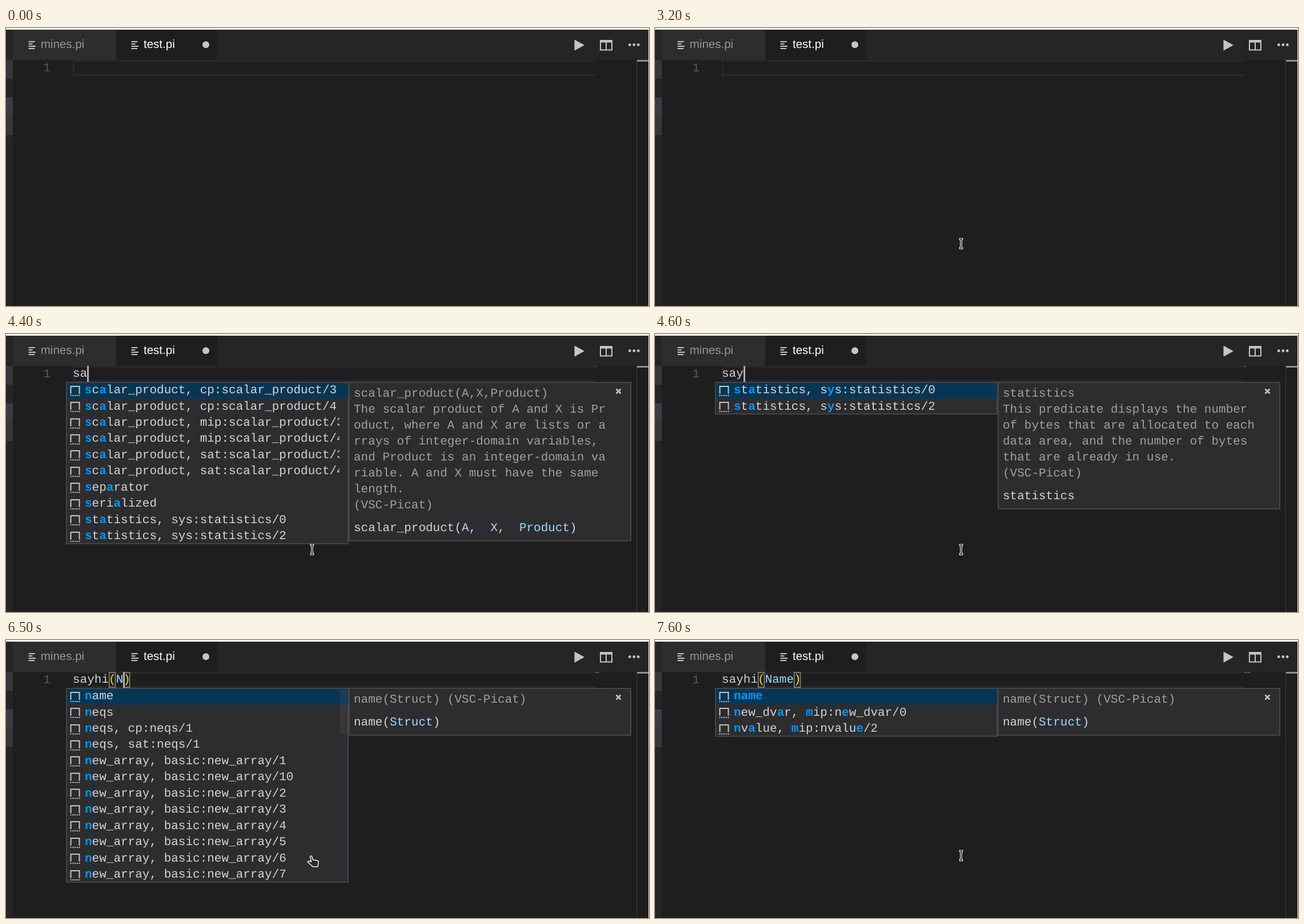
An HTML page for the animation above (8000 ms loop, 1126x488 px).

```html
<!DOCTYPE html>
<html lang="en">
<head>
<meta charset="utf-8">
<title>Editor completion</title>
<style>
html, body { margin: 0; width: 100%; height: 100%; overflow: hidden; background: #1e1e1e; }
svg { display: block; }
text { white-space: pre; text-rendering: geometricPrecision; }
.code, .code text { font: 21px "Liberation Mono", monospace; fill: #d4d4d4; }
.code .dim { fill: #a0a0a0; }
.var { fill: #9cdcfe; }
.bracket { fill: #ffd700; }
.hit { fill: #0097fb; font-weight: bold; }
.tab { font: 20.5px "Liberation Sans", sans-serif; }
.panel { fill: #2d2d30; stroke: #454545; stroke-width: 2; }
.match { fill: none; stroke: #888; stroke-width: 1.6; }
.icon { fill: none; stroke: #c5c5c5; stroke-width: 2; }
</style>
</head>
<body>
<svg width="1126" height="488" viewBox="0 0 1126 488">
  <defs>
    <clipPath id="listClip"><rect x="107" y="86" width="477" height="340"/></clipPath>
    <linearGradient id="tint" x2="0" y2="1">
      <stop stop-color="#3a3d49"/><stop offset="1" stop-color="#3f3743"/>
    </linearGradient>
    <path id="file" class="icon" d="M0 0H11M0 4H7M0 8H12.5M0 12H10.5" stroke-width="1.7"/>
    <g id="snippet" class="icon">
      <path d="M1 14V1H16V14"/>
      <path d="M0 17H17" stroke-dasharray="2 1.75"/>
    </g>
    <g id="arrow"><path d="M0 0V16L4 12.5L6.5 18.5L9.5 17.2L7 11.5H12Z" fill="#111" stroke="#fff" stroke-width="1.2"/></g>
    <g id="beam" fill="none">
      <path d="M-3.3 -8H3.3M-3.3 8H3.3M0 -9V9" stroke="#fff" stroke-width="3.6"/>
      <path d="M-2.2 -8H2.2M-2.2 8H2.2M0 -8V8" stroke="#111" stroke-width="1.4"/>
    </g>
    <path id="hand" d="M-3.5 1.5Q-2 -.5 -.3 1.5L1.5 7.5L9 8.6Q11.5 9.3 11.3 11.5L10 19.5H1.5L-4 14.5L-7.8 11.5Q-7.5 9 -4.5 9.7L-1.5 11Z"
      fill="#2a2a2a" stroke="#f4f4f4" stroke-width="1.5" stroke-linejoin="round"/>
  </defs>

  <rect width="1126" height="488" fill="#1e1e1e"/>
  <rect width="12" height="488" fill="#252526"/>
  <rect y="56" width="12" height="33" fill="#37373a"/>
  <rect y="122" width="12" height="33" fill="url(#tint)"/>
  <rect y="155" width="12" height="33" fill="#37373a"/>
  <rect y="3" width="1126" height="53" fill="#252526"/>
  <rect x="12" y="3" width="180" height="53" fill="#2d2d2d"/>
  <rect x="194" y="3" width="176" height="53" fill="#1e1e1e"/>
  <rect width="1126" height="3" fill="#eff1f0"/>
  <rect x="1125" width="1" height="488" fill="#e4e6e5"/>

  <use href="#file" x="39.5" y="24"/>
  <text class="tab" x="60.8" y="35" fill="#969696">mines.pi</text>
  <use href="#file" x="219.5" y="24"/>
  <text class="tab" x="241" y="35" fill="#fff">test.pi</text>
  <g fill="#c5c5c5">
    <circle cx="350" cy="29.3" r="6"/>
    <path d="M995.5 20.5L1013 30L995.5 39.7Z"/>
    <path d="M1040 21H1062V39.5H1040ZM1042 25.5V37.5H1050V25.5ZM1052 25.5V37.5H1060V25.5Z" fill-rule="evenodd"/>
    <circle cx="1092.3" cy="29.5" r="2.4"/><circle cx="1099.8" cy="29.5" r="2.4"/><circle cx="1107.2" cy="29.5" r="2.4"/>
  </g>

  <path d="M1032 57.5H118.5V82.5H1032" fill="none" stroke="#282828" stroke-width="3"/>
  <rect x="1104" y="56" width="1" height="432" fill="#3b3b3b"/>
  <rect x="1105" y="56" width="20" height="3" fill="#8f8f8f"/>
  <text class="code" x="65.3" y="76" style="fill:#5a5a5a">1</text>

  <g id="view" class="code"></g>
  <rect id="caret" y="56" width="3" height="28" fill="#aeafad"/>
  <use id="mouse"/>
</svg>
<script>
const LOOP = 8000, TICK = 100, CHAR = 12.602, LEFT = 117, ROW = 28.45, LIST_TOP = 84.6;
const $ = id => document.getElementById(id);
const span = (cls, s) => `<tspan class="${cls}">${s}</tspan>`;
const text = (x, y, s, cls = '') => `<text x="${x}" y="${y}" class="${cls}">${s}</text>`;
const arity = (mod, name, ...ns) => ns.map(n => `${name}, ${mod}:${name}/${n}`);

const scalar = ['cp', 'mip', 'sat'].flatMap(m => arity(m, 'scalar_product', 3, 4));
const stats = arity('sys', 'statistics', 0, 2);
const arrays = arity('basic', 'new_array', 1, 10, 2, 3, 4, 5, 6, 7, 8, 9);
const dvar = arity('mip', 'new_dvar', 0), nvalue = arity('mip', 'nvalue', 2);

const lists = {
  s: [...scalar, 'sec', 'sech', 'second', 'select', 'separator', 'serialized'],
  sa: [...scalar, 'separator', 'serialized', ...stats],
  say: stats,
  n: ['name', 'neqs', ...arity('cp', 'neqs', 1), ...arity('sat', 'neqs', 1), ...arrays.slice(0, 8)],
  na: ['name', ...arrays, ...dvar],
  nam: ['name', ...arity('basic', 'new_map', 1, 2), ...dvar, ...nvalue],
  name: ['name', ...dvar, ...nvalue]
};
const thumb = { s: 61, n: 79, na: 150 };

const docs = {
  scalar: [['scalar_product(A,X,Product)', 'The scalar product of A and X is Pr',
    'oduct, where A and X are lists or a', 'rrays of integer-domain variables,',
    'and Product is an integer-domain va', 'riable. A and X must have the same', 'length.', '(VSC-Picat)'],
    `scalar_product(${span('var', 'A')},  ${span('var', 'X')},  ${span('var', 'Product')})`],
  stats: [['statistics', 'This predicate displays the number', 'of bytes that are allocated to each',
    'data area, and the number of bytes', 'that are already in use.', '(VSC-Picat)'], 'statistics'],
  name: [['name(Struct) (VSC-Picat)'], `name(${span('var', 'Struct')})`]
};

// [start, typed text, list, doc, caret hidden]
const states = [
  [0, '', '', '', true],
  [1700, ''],
  [3200, '', '', '', true],
  [3800, 's', 's', 'scalar'],
  [4400, 'sa', 'sa', 'scalar'],
  [4500, 'say', 'say', 'scalar'],
  [4600, 'say', 'say', 'stats'],
  [5300, 'sayh', 'say', 'stats'],
  [5400, 'sayh'],
  [5500, 'sayhi'],
  [6100, 'sayhi('],
  [6500, 'sayhi(N', 'n', 'name'],
  [6600, 'sayhi(Na', 'n', 'name'],
  [6700, 'sayhi(Na', 'na', 'name'],
  [6800, 'sayhi(Nam', 'na', 'name'],
  [6900, 'sayhi(Nam', 'nam', 'name'],
  [7100, 'sayhi(Name', 'nam', 'name'],
  [7200, 'sayhi(Name', 'name', 'name']
].map(([start, typed, list, doc, still]) => ({ start, typed, list, doc, still }));
states.forEach((s, i) => {
  const prev = states[i - 1];
  s.base = prev && prev.typed && prev.typed === s.typed ? prev.base : s.start;
});

// Marks the letters of the query in order of appearance.
function highlight(label, query) {
  let k = 0;
  return [...label].map(c => c === query[k] ? (k++, span('hit', c)) : c).join('');
}

function lineView(typed) {
  const [word, arg] = typed.split('(');
  if (arg === undefined) return text(LEFT, 75, word);
  const box = i => `<rect class="match" x="${LEFT + i * CHAR + .8}" y="57" width="10.6" height="26"/>`;
  return box(word.length) + box(typed.length) +
    text(LEFT, 75, word + span('bracket', '(') + span('var', arg) + span('bracket', ')'));
}

function minimap(typed) {
  const all = typed.includes('(') ? typed + ')' : typed;
  return [...all].map((c, i) =>
    `<rect x="${1032 + i}" y="56.5" width="1" height="1.5" fill="#aaa" opacity="${/[()]/.test(c) ? .2 : .55}"/>`).join('');
}

function listView(key) {
  const rows = lists[key];
  const items = rows.map((label, i) => {
    const y = LIST_TOP + i * ROW;
    return `<use href="#snippet" x="112.5" y="${Math.round(y + 6)}"/>` +
      text(138, (y + 19.5).toFixed(1), highlight(label, key));
  }).join('');
  const bar = thumb[key] ? `<rect x="584" y="86" width="15" height="${thumb[key]}" fill="#797979" opacity=".12"/>` : '';
  return `<rect class="panel" x="106" y="85" width="493" height="${rows.length * ROW - 1.4}"/>
    <rect x="107" y="86" width="492" height="27" fill="#073655"/>${bar}
    <g clip-path="url(#listClip)">${items}</g>`;
}

function docView([lines, sign]) {
  const n = lines.length;
  return `<rect class="panel" x="601" y="85" width="493" height="${54 + 28 * n}"/>` +
    lines.map((s, i) => text(609, 110 + 28 * i, s, 'dim')).join('') +
    text(609, 122 + 28 * n, sign) +
    '<path d="M1068.5 96.5L1076.5 104.5M1076.5 96.5L1068.5 104.5" class="icon" style="stroke-width:2.6"/>';
}

const ease = p => p * p * (3 - 2 * p);
const glide = (a, b, p) => a.map((v, i) => v + (b[i] - v) * ease(Math.min(1, Math.max(0, p))));
const ENTRY = [235, 4], CLICK = [447, 83], REST = [536, 378.5];

function drawMouse(t, state) {
  const mouse = $('mouse');
  mouse.style.display = t < 800 ? 'none' : '';
  const now = Math.floor(t / TICK) * TICK;
  const [x, y] = now < 1700 ? glide(ENTRY, CLICK, (now - 800) / 700) : glide(CLICK, REST, (now - 1700) / 600);
  const over = state.list && y < LIST_TOP + lists[state.list].length * ROW;
  mouse.setAttribute('href', over ? '#hand' : y < 56 ? '#arrow' : '#beam');
  mouse.setAttribute('transform', `translate(${x} ${y})`);
}

let shown;
function frame() {
  const t = performance.now() % LOOP;
  const state = states.findLast(s => s.start <= t);
  if (state !== shown) {
    shown = state;
    $('view').innerHTML = lineView(state.typed) + minimap(state.typed) +
      (state.list ? listView(state.list) : '') + (state.doc ? docView(docs[state.doc]) : '');
    $('caret').setAttribute('x', Math.round(LEFT + state.typed.length * CHAR));
  }
  const lit = !state.still && (t - state.base) % 1000 < 500;
  $('caret').style.display = lit ? '' : 'none';
  drawMouse(t, state);
  requestAnimationFrame(frame);
}
frame();
</script>
</body>
</html>
```
